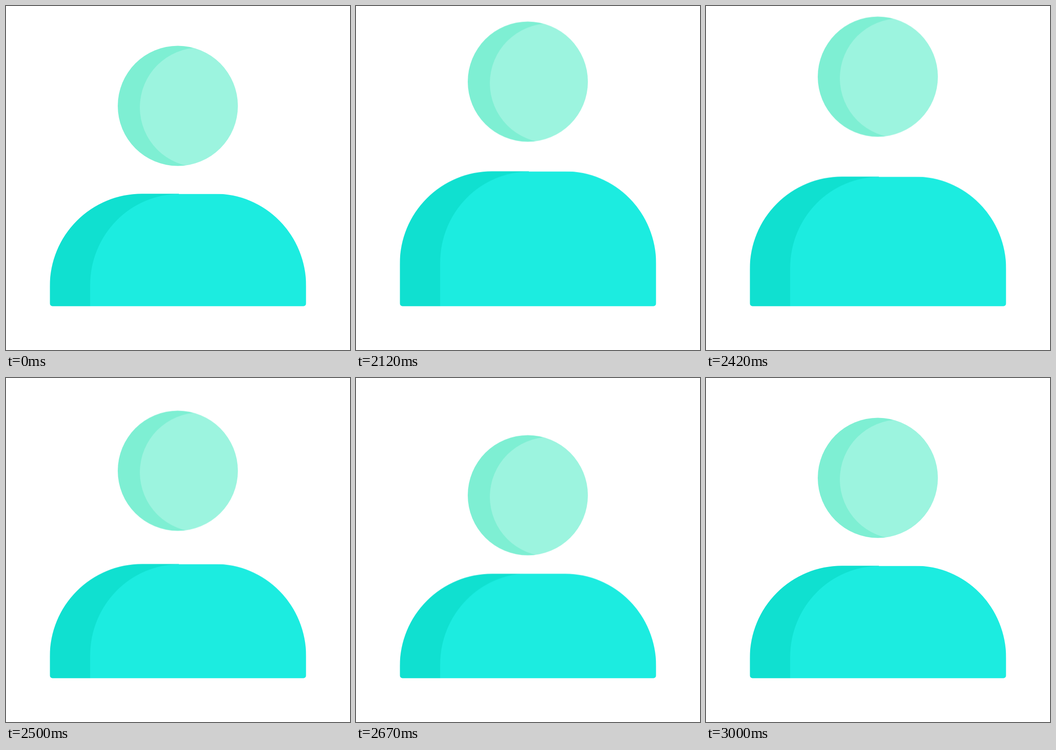
Write an HTML page without scripts that moves like this. It is 748 px wide and 748 px high and loops after 3020 ms.

```html
<!DOCTYPE html>
<html lang="en">
<head>
<meta charset="utf-8">
<title>Bouncing user icon</title>
<style>
  html, body { margin: 0; width: 100%; height: 100%; overflow: hidden; background: #fff; }
  svg { display: block; width: 100vw; height: 100vh; }

  .head, .body, .shine { animation: 3020ms linear infinite; }
  .head { animation-name: head; }
  .body { animation-name: body; }
  .shine { animation-name: shine; }

  /* Still for two seconds, then jump, dip and settle */
  @keyframes head {
    0%, 66.86% { transform: translateY(0); }
    66.88% { transform: translateY(-1.5px); animation-timing-function: cubic-bezier(.3, .14, .276, 1); }
    75.166% { transform: translateY(-78.7px); animation-timing-function: cubic-bezier(.833, 0, .443, 1); }
    87.583% { transform: translateY(38px); animation-timing-function: cubic-bezier(.61, 0, .66, 1); }
    99.338%, 100% { transform: translateY(0); }
  }
  @keyframes body {
    0%, 66.86% { transform: translateY(0); }
    66.88% { transform: translateY(-11.6px); animation-timing-function: cubic-bezier(.2, .36, .524, 1); }
    74.338% { transform: translateY(-65px); animation-timing-function: cubic-bezier(.57, 0, .589, 1); }
    86.755% { transform: translateY(18px); animation-timing-function: cubic-bezier(.45, 0, .611, 1); }
    99.338%, 100% { transform: translateY(0); }
  }
  @keyframes shine {
    0%, 84.437% { transform: translateY(0); }
    92.715% { transform: translateY(-3.5px); }
    99.338%, 100% { transform: translateY(0); }
  }
</style>
</head>
<body>
<svg viewBox="0 0 748 748">
  <defs>
    <clipPath id="face"><circle cx="373.6" cy="217.2" r="130.6"/></clipPath>
    <clipPath id="torso">
      <path d="M95.3 800V608.7A200.5 200.5 0 0 1 295.8 408.2H455A197.6 200.5 0 0 1 652.6 608.7V800Z"/>
    </clipPath>
    <clipPath id="base">
      <path d="M95.3 0H652.6V646.7A6 6 0 0 1 646.6 652.7H101.3A6 6 0 0 1 95.3 646.7Z"/>
    </clipPath>
  </defs>

  <g class="head">
    <g clip-path="url(#face)">
      <rect x="240" y="80" width="270" height="275" fill="#7eefd3"/>
      <circle cx="421" cy="220.5" r="130" fill="#9cf4df"/>
    </g>
  </g>

  <g clip-path="url(#base)">
    <g class="body">
      <g clip-path="url(#torso)">
        <rect x="90" y="400" width="286" height="400" fill="#10e0d0"/>
        <path class="shine" d="M183 820V606.7A195 198 0 0 1 378 408.7H700V820Z" fill="#1cece0"/>
      </g>
    </g>
  </g>
</svg>
</body>
</html>
```
